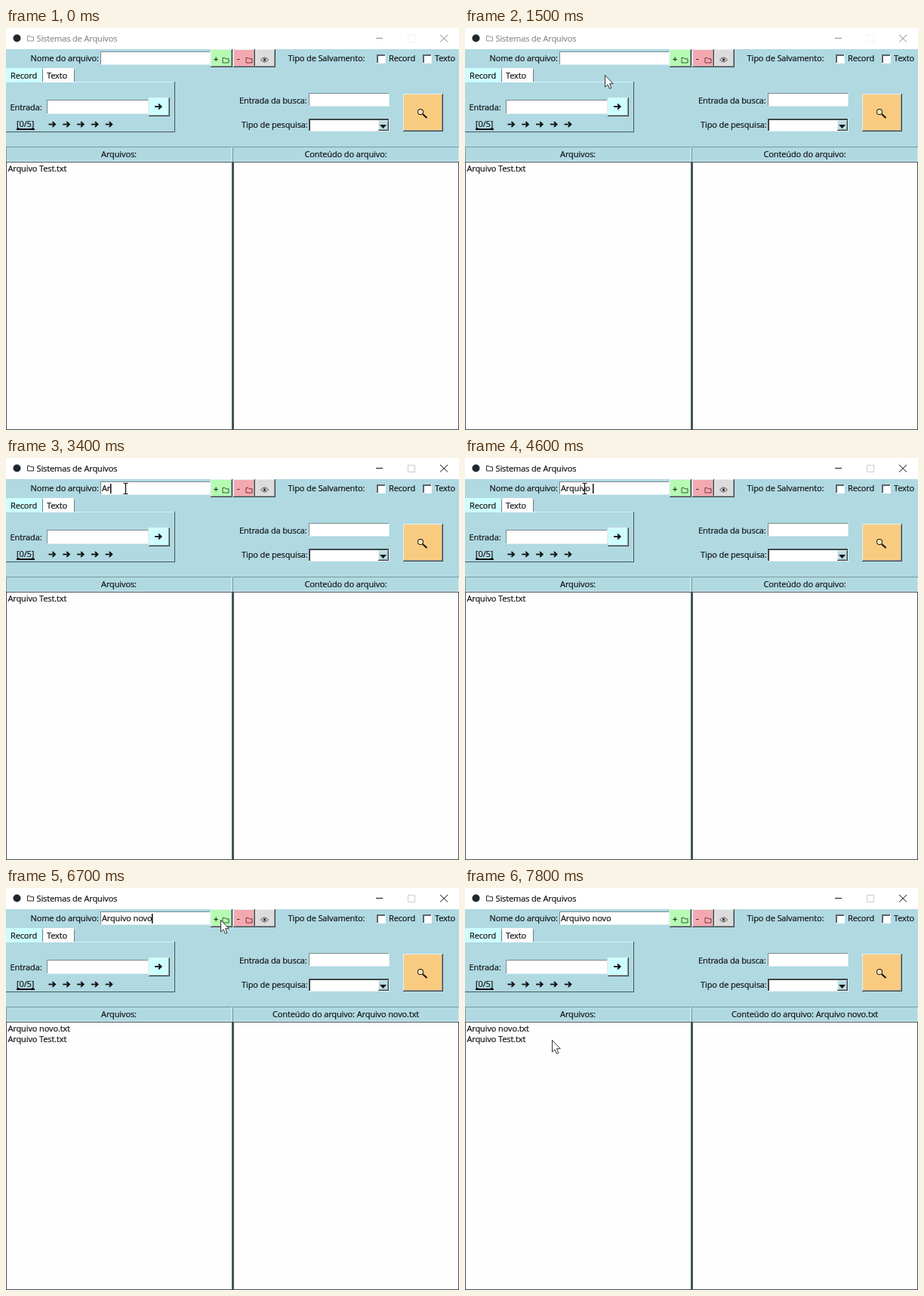
These frames come from a looping animation (600 px wide and 532 px high, 8000 ms). An HTML page with a canvas:

```html
<!DOCTYPE html>
<html lang="pt">
<head>
<meta charset="utf-8">
<style>
  html, body { margin: 0; width: 100%; height: 100%; overflow: hidden; }
  canvas { display: block; }
</style>
</head>
<body>
<canvas id="stage" width="600" height="532"></canvas>
<script>
const ctx = document.getElementById('stage').getContext('2d');
const LOOP = 8000, STEP = 100;
const FOCUS_AT = 1700, CREATE_AT = 6700;
const BLUE = '#b0d9e2', CYAN = '#cdfeff', INK = '#111', EDGE = '#46545a';
const NAME = 'Arquivo novo';
const KEY_TIMES = [3200, 3400, 3600, 3800, 3900, 4000, 4200, 4500, 4750, 4950, 5150, 5300];

// Pointer path: time, x, y
const PATH = [
  [400, 600, 385], [800, 310, 330], [850, 270, 318], [900, 225, 245],
  [1300, 215, 120], [1500, 185, 62], [1700, 158, 40], [5700, 158, 40],
  [6000, 186, 48], [6050, 203, 60], [6200, 250, 58], [6400, 284, 42],
  [6850, 284, 42], [7200, 267, 123], [7250, 259, 146], [7500, 135, 207],
  [7600, 115, 206], [7800, 115, 201]
];

function rect(x, y, w, h, color) {
  ctx.fillStyle = color;
  ctx.fillRect(x, y, w, h);
}

function text(str, x, y, color = INK, align = 'left') {
  ctx.fillStyle = ctx.strokeStyle = color;
  ctx.textAlign = align;
  ctx.lineWidth = 0.2;
  ctx.fillText(str, x, y);
  ctx.strokeText(str, x, y);
}

function trace(points) {
  ctx.beginPath();
  points.forEach(([x, y]) => ctx.lineTo(x, y));
}

function stroke(points, color = INK, width = 1, close = false) {
  trace(points);
  if (close) ctx.closePath();
  ctx.strokeStyle = color;
  ctx.lineWidth = width;
  ctx.stroke();
}

function fill(points, color = INK) {
  trace(points);
  ctx.fillStyle = color;
  ctx.fill();
}

function circle(x, y, r, color) {
  ctx.beginPath();
  ctx.arc(x, y, r, 0, 7);
  ctx.fillStyle = color;
  ctx.fill();
}

function button(x, y, w, h, color) {
  rect(x, y, w, h, '#444');
  rect(x, y, w - 1, h - 1, '#e6f0f0');
  rect(x + 1, y + 1, w - 2, h - 2, '#8a9699');
  rect(x + 1, y + 1, w - 3, h - 3, color);
}

function field(x, y, w, h) {
  rect(x, y, w, h, '#dcecf0');
  rect(x, y, w - 1, h - 1, '#7f898c');
  rect(x + 1, y + 1, w - 2, h - 2, '#fff');
}

function checkbox(x, y) {
  rect(x, y, 12, 12, '#f4f8f8');
  rect(x, y, 11, 11, '#5c6568');
  rect(x + 2, y + 2, 9, 9, '#fff');
}

function folder(x, y, color) {
  stroke([[x, y + 6.5], [x, y], [x + 3, y], [x + 4, y + 1.3], [x + 8, y + 1.3], [x + 8, y + 6.5]], color, 0.9, true);
}

function arrow(x, y) {
  rect(x, y - 0.9, 6, 1.8, INK);
  fill([[x + 4.5, y - 3.7], [x + 6, y - 3.7], [x + 10, y], [x + 6, y + 3.7], [x + 4.5, y + 3.7], [x + 6, y]]);
}

function header(x, w, label) {
  rect(x, 157, w, 20, '#7d9aa1');
  rect(x + 1, 158, w - 1, 19, '#d3eaef');
  rect(x + 1, 158, w - 2, 18, BLUE);
  text(label, x + w / 2, 171, INK, 'center');
}

function lists(rows) {
  rect(0, 177, 600, 355, EDGE);
  rect(1, 178, 298, 353, '#fefefe');
  rect(302, 178, 297, 353, '#fefefe');
  rows.forEach((row, i) => text(row, 2.5, 190 + 14 * i));
}

function titleBar(active) {
  const ink = active ? INK : '#8c8c8c';
  rect(0, 0, 600, 28, '#fff');
  circle(14.5, 13.5, 5, '#20282e');
  folder(28.5, 10.5, ink);
  text('Sistemas de Arquivos', 40.5, 18, ink);
  stroke([[490, 13.5], [499, 13.5]], ink);
  stroke([[532.5, 9.5], [541.5, 9.5], [541.5, 18.5], [532.5, 18.5]], active ? '#ccc' : '#f1f1f1', 1, true);
  stroke([[575, 9], [585, 18.5]], ink);
  stroke([[585, 9], [575, 18.5]], ink);
}

function eye(x, y) {
  ctx.beginPath();
  ctx.moveTo(x - 5, y);
  ctx.quadraticCurveTo(x, y - 6, x + 5, y);
  ctx.quadraticCurveTo(x, y + 6, x - 5, y);
  ctx.strokeStyle = '#444';
  ctx.lineWidth = 0.9;
  ctx.stroke();
  circle(x, y, 1.8, '#333');
}

function nameRow(t) {
  text('Nome do arquivo:', 32.5, 44);
  field(125, 31, 146, 18);
  const keys = KEY_TIMES.filter(k => k <= t);
  const typed = NAME.slice(0, keys.length);
  text(typed, 127, 44);
  // The caret stays on 600 ms, off 300 ms, restarting with each key
  const last = Math.max(FOCUS_AT, ...keys);
  if (t >= FOCUS_AT && (t - last) % 900 < 600) {
    rect(Math.round(127 + ctx.measureText(typed).width), 34, 1.5, 13, INK);
  }
  button(271, 28, 29, 24, '#b5fbb1');
  button(301, 28, 29, 24, '#f4a9b0');
  button(330, 28, 27, 24, '#dcdcdc');
  text('+', 275, 45);
  folder(287, 39.5, '#274a27');
  text('-', 306, 44);
  folder(318, 39.5, '#6a262c');
  eye(342.5, 42);
  text('Tipo de Salvamento:', 373.5, 44);
  checkbox(491, 35);
  text('Record', 507, 44);
  checkbox(552, 35);
  text('Texto', 568, 44);
}

function tabs() {
  rect(0, 71, 223, 1, '#d8f0f5');
  rect(223, 71, 1, 67, EDGE);
  rect(0, 137, 224, 1, EDGE);
  for (const [x, w, color, label, tx] of [[0, 48, CYAN, 'Record', 6], [49, 41, '#fdfdfd', 'Texto', 54]]) {
    ctx.beginPath();
    ctx.roundRect(x, 53, w, 19, [2, 2, 0, 0]);
    ctx.fillStyle = color;
    ctx.fill();
    rect(x + w, 55, 1, 16, '#6c7d81');
    text(label, tx, 67);
  }
  text('Entrada:', 5.5, 108.5);
  field(54, 95, 135, 19);
  button(189, 92, 28, 25, CYAN);
  arrow(197, 104);
  text('[0/5]', 14, 131);
  rect(14, 133, 24, 2, INK);
  for (let i = 0; i < 5; i++) arrow(56.5 + 18.8 * i, 127.5);
}

function search() {
  text('Entrada da busca:', 309, 99.5);
  field(401, 86, 107, 18);
  text('Tipo de pesquisa:', 312, 132);
  rect(401, 120, 107, 17, '#e6f2f5');
  rect(401, 120, 106, 16, '#3e484b');
  rect(403, 122, 104, 14, '#fff');
  button(493, 122, 14, 14, '#b8dde5');
  fill([[495, 128], [504, 128], [499.5, 133]]);
  button(526, 87, 53, 50, '#f8cb80');
  circle(549, 111, 4, INK);
  circle(549, 111, 3.1, '#fbe3b8');
  stroke([[552, 114], [557.5, 119]], INK, 2);
}

function pointerAt(t) {
  const i = PATH.findIndex(p => p[0] > t);
  if (i < 0) return PATH[PATH.length - 1].slice(1);
  const [t0, x0, y0] = PATH[i - 1], [t1, x1, y1] = PATH[i];
  const k = (t - t0) / (t1 - t0);
  return [x0 + (x1 - x0) * k, y0 + (y1 - y0) * k];
}

function pointer([x, y], alpha) {
  ctx.save();
  ctx.globalAlpha = alpha;
  ctx.translate(Math.round(x) + 0.5, Math.round(y) + 0.5);
  if (x > 125 && x < 270 && y > 30 && y < 50) {
    stroke([[0, -7], [0, 7]], INK, 1.3);
    for (const end of [-7, 7]) stroke([[-3, end], [3, end]], INK);
  } else {
    const shape = [[0, 0], [0, 15.5], [3.5, 12.3], [6, 17.8], [8.3, 16.8], [6, 11.2], [10.7, 11.2]];
    fill(shape, '#fff');
    stroke(shape, '#333', 1, true);
  }
  ctx.restore();
}

function draw(t) {
  const created = t >= CREATE_AT;
  ctx.font = '11px "Open Sans", "Noto Sans", sans-serif';
  ctx.letterSpacing = '-0.12px';
  rect(0, 0, 600, 532, BLUE);
  titleBar(t >= FOCUS_AT);
  nameRow(t);
  tabs();
  search();
  header(0, 299, 'Arquivos:');
  header(300, 300, 'Conteúdo do arquivo:' + (created ? ` ${NAME}.txt` : ''));
  lists((created ? [`${NAME}.txt`] : []).concat('Arquivo Test.txt'));
  if (t < PATH[0][0]) return;
  const here = pointerAt(t), next = pointerAt(t + STEP / 2);
  // Fast moves leave a faint second pointer
  if (t > FOCUS_AT && Math.hypot(next[0] - here[0], next[1] - here[1]) > 8) pointer(next, 0.2);
  pointer(here, 1);
}

function frame() {
  const t = performance.now() % LOOP;
  draw(Math.floor(t / STEP) * STEP);
  requestAnimationFrame(frame);
}
frame();
</script>
</body>
</html>
```
